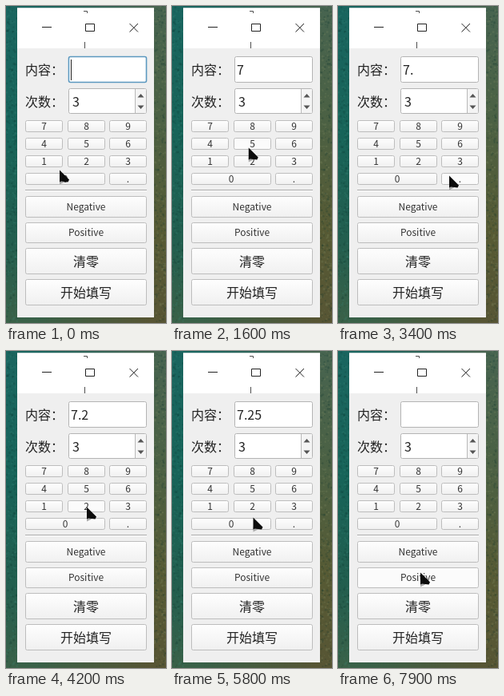
An HTML page for the animation above (8 s loop, 200 by 397 pixels).

```html
<!DOCTYPE html>
<html lang="zh-CN">
<head>
<meta charset="utf-8">
<title>Keypad</title>
<style>
html, body { margin: 0; height: 100%; overflow: hidden; background: #24584e; }
svg { display: block; width: 100vw; height: 100vh; }
text { font: 16px "Noto Sans CJK SC", "Noto Sans CJK", "Noto Sans", sans-serif; fill: #222; white-space: pre; }
.small { font-size: 12px; fill: #333; }
.mid { text-anchor: middle; }
.line { fill: none; stroke: #222; }
.box { fill: #fff; stroke: #b4b4b4; }
.key { fill: url(#face); stroke: #bdbdbd; }
.key.hover { fill: #fbfbfb; }
.key.down { fill: #d9d9d9; stroke: #a6a6a6; }
.focus { stroke: #5b98bf; stroke-width: 1.6; }
</style>
</head>
<body>
<svg id="stage" viewBox="0 0 200 397" preserveAspectRatio="none">
  <defs>
    <linearGradient id="face" x2="0" y2="1">
      <stop stop-color="#fefefe"/><stop offset="1" stop-color="#f0f0f0"/>
    </linearGradient>
    <linearGradient id="left" x2="0" y2="1">
      <stop stop-color="#1a655f"/><stop offset=".4" stop-color="#176459"/>
      <stop offset=".75" stop-color="#235e4e"/><stop offset="1" stop-color="#3a6148"/>
    </linearGradient>
    <linearGradient id="right" x2="0" y2="1">
      <stop stop-color="#476450"/><stop offset=".35" stop-color="#4b6144"/>
      <stop offset=".7" stop-color="#565a34"/><stop offset="1" stop-color="#575534"/>
    </linearGradient>
    <linearGradient id="fade">
      <stop offset=".2" stop-color="#fff" stop-opacity="0"/><stop offset=".9" stop-color="#fff"/>
    </linearGradient>
    <mask id="blend"><rect width="200" height="397" fill="url(#fade)"/></mask>
  </defs>
  <rect width="200" height="397" fill="url(#left)"/>
  <rect width="200" height="397" fill="url(#right)" mask="url(#blend)"/>
  <g id="specks"></g>
  <rect x="14" y="2.5" width="171" height="387.5" fill="#efefef"/>
  <rect x="14" y="2.5" width="171" height="50.5" fill="#fff"/>
  <path class="line" d="M45 26.5H57M99.5 22.5H110.5V31.5H99.5ZM154.5 22L165 32.5M165 22L154.5 32.5"/>
  <path class="line" d="M97 6.5H101.5V9M98.5 45V53" stroke-opacity=".8"/>
  <text x="24" y="86">内容：</text>
  <text x="24" y="126">次数：</text>
  <rect id="field" class="box" x="78.5" y="63.5" width="97" height="32" rx="2"/>
  <text id="value" x="81" y="86"></text>
  <path id="caret" class="line" d="M81.5 67V93"/>
  <rect class="box" x="78.5" y="103.5" width="97" height="31" rx="2"/>
  <path d="M162 104H174Q175 104 175 105V133Q175 134 174 134H162Z" fill="#f4f4f4"/>
  <path d="M161.5 104V134" stroke="#b9b9b9"/>
  <path d="M164.5 114.5L168.5 110L172.5 114.5ZM164.5 124.5L168.5 129L172.5 124.5Z" fill="#555"/>
  <text x="83" y="126">3</text>
  <path d="M24 230.5H176" stroke="#aaa"/>
  <path d="M24 231.5H176" stroke="#fff"/>
  <g id="keys"></g>
  <g id="cursor">
    <path d="M0 12H6V15.5L0 18.5Z" fill="#aaa"/>
    <path d="M0 0.5L12 12.5L10.5 15.5L2 14.5L0 15.5Z" fill="#0c0c0c"/>
  </g>
</svg>
<script>
const $ = id => document.getElementById(id);

function add(parent, tag, attrs, text = '') {
  const el = document.createElementNS('http://www.w3.org/2000/svg', tag);
  for (const name in attrs) el.setAttribute(name, attrs[name]);
  el.textContent = text;
  return parent.appendChild(el);
}

// Mottled wallpaper around the window
let seed = 7;
const rnd = () => (seed = seed * 16807 % 2147483647) / 2147483647;
for (let i = 0; i < 900; i++) {
  const x = rnd() < .5 ? rnd() * 14 : 185 + rnd() * 15;
  add($('specks'), 'circle', {
    cx: x, cy: rnd() * 397, r: .5 + rnd() * 1.1,
    fill: rnd() < .5 ? '#0a332e' : x < 100 ? '#3b8a7c' : '#869068', opacity: .2
  });
}

const keys = [];
function key(label, x, y, w, h, small = true) {
  const rect = add($('keys'), 'rect', { x: x + .5, y: y + .5, width: w - 1, height: h - 1, rx: 2 });
  const baseline = y + h / 2 + (small ? 4.5 : 6.5);
  add($('keys'), 'text', { x: x + w / 2, y: Math.floor(baseline), class: small ? 'mid small' : 'mid' }, label);
  keys.push({ rect, x, y, w, h });
}
['789', '456', '123'].forEach((row, r) =>
  [...row].forEach((n, c) => key(n, [24, 77, 129][c], 143 + 22 * r, 47, 15)));
key('0', 24, 209, 100, 15);
key('.', 129, 209, 47, 15);
key('Negative', 24, 238, 152, 27);
key('Positive', 24, 271, 152, 26);
key('清零', 24, 303, 152, 33, false);
key('开始填写', 24, 342, 152, 33, false);

// Pointer stops: time, x, y
const path = [
  [0, 67, 205], [800, 55, 149], [1100, 55, 149], [2400, 161, 222], [2700, 150, 215],
  [3200, 150, 215], [3400, 139, 212], [3800, 101, 195], [4400, 101, 195], [4900, 101, 184],
  [5200, 101, 172], [5500, 101, 172], [6700, 103, 316], [7400, 103, 316], [7900, 103, 277], [8000, 103, 277]
];
// Clicks: press time, release time, resulting text
const clicks = [
  [800, 1000, '7'], [2700, 2800, '7.'], [4100, 4200, '7.2'], [5300, 5400, '7.25'], [7300, 7400, '']
];

function pointer(t) {
  const i = path.findIndex(p => p[0] > t);
  const [t0, x0, y0] = path[i - 1], [t1, x1, y1] = path[i];
  const k = (t - t0) / (t1 - t0);
  return [x0 + (x1 - x0) * k, y0 + (y1 - y0) * k];
}

function draw(now) {
  const t = Math.floor(now % 8000 / 100) * 100;
  const [x, y] = pointer(t);
  const pressed = clicks.some(([down, up]) => t >= down && t < up);
  const done = clicks.filter(c => t >= c[1]);
  for (const k of keys) {
    const over = x >= k.x && x < k.x + k.w && y >= k.y && y < k.y + k.h;
    k.rect.setAttribute('class', 'key' + (over ? pressed ? ' down' : ' hover' : ''));
  }
  $('value').textContent = done.length ? done[done.length - 1][2] : '';
  $('field').setAttribute('class', t < 800 ? 'box focus' : 'box');
  $('caret').setAttribute('visibility', t < 600 ? 'visible' : 'hidden');
  $('cursor').setAttribute('transform', `translate(${x} ${y})`);
}

const start = performance.now();
function loop() {
  draw(performance.now() - start);
  requestAnimationFrame(loop);
}
loop();
</script>
</body>
</html>
```
